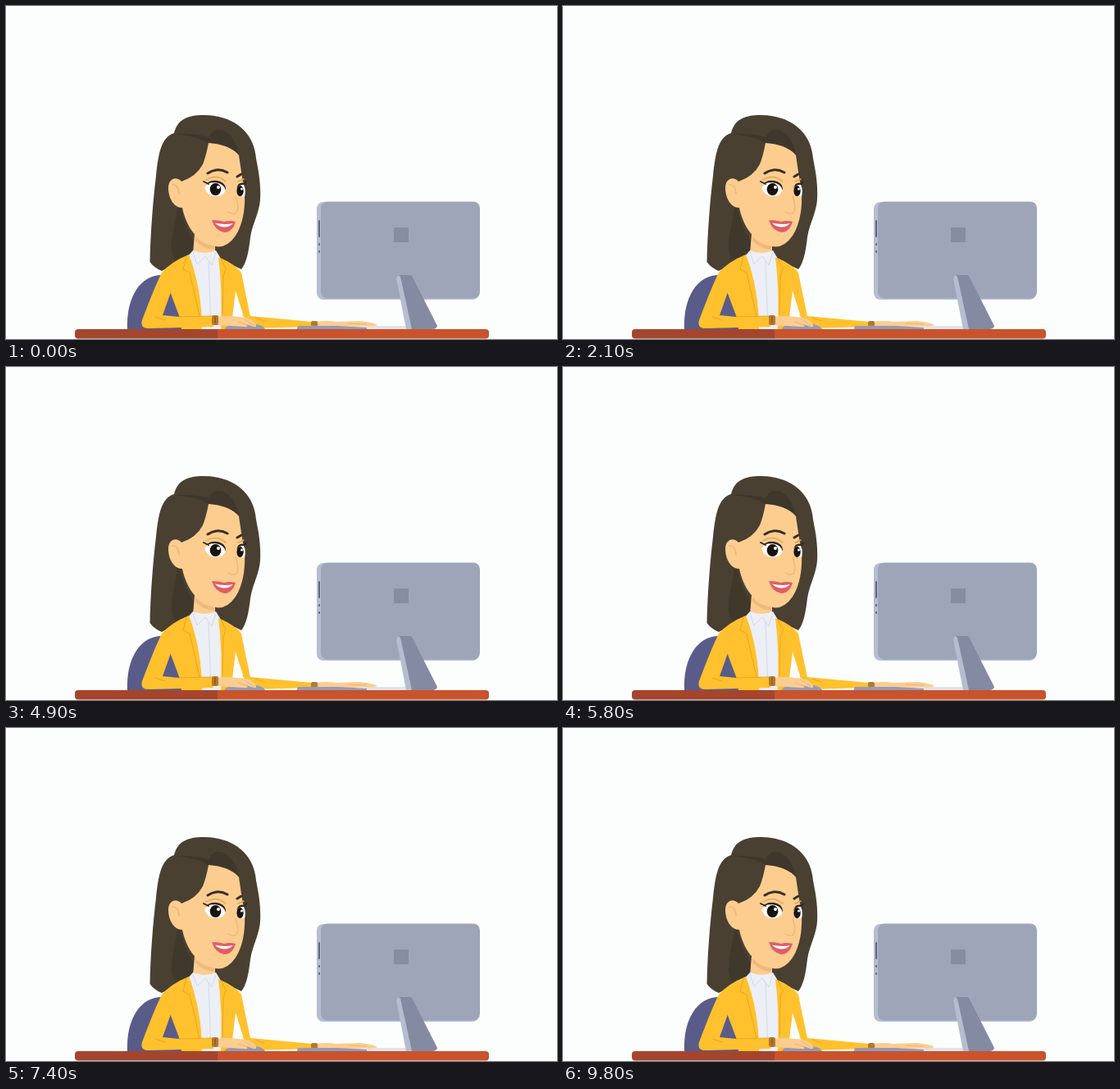
An HTML page for the animation above (10000 ms loop, 672 by 406 pixels).

```html
<!DOCTYPE html>
<html lang="en">
<head>
<meta charset="utf-8">
<title>At the desk</title>
<style>
html, body { margin: 0; width: 100%; height: 100%; overflow: hidden; background: #fcfefd; }
svg { display: block; width: 100%; height: 100%; }
.arm { transform-origin: 190px 325px; animation: slide 5s linear infinite; }
.lid { animation: blink 5s linear infinite; }
@keyframes slide {
  0%, 48% { transform: skewX(0); animation-timing-function: ease-in-out; }
  60%, 67% { transform: skewX(6.9deg); animation-timing-function: ease-in-out; }
  78%, 100% { transform: skewX(0); }
}
@keyframes blink {
  0%, 20% { transform: translateY(0); }
  24%, 25% { transform: translateY(12px); }
  28%, 100% { transform: translateY(0); }
}
</style>
</head>
<body>
<svg viewBox="0 0 672 406" fill="none" stroke-linecap="round" stroke-linejoin="round">
  <defs>
    <clipPath id="eyes">
      <ellipse cx="255" cy="223" rx="13" ry="10.5"/>
      <ellipse cx="287.500" cy="225" rx="6.500" ry="10"/>
    </clipPath>
    <linearGradient id="desk">
      <stop offset=".345" stop-color="#a5452d"/>
      <stop offset=".345" stop-color="#c9532c"/>
    </linearGradient>
  </defs>

  <!-- chair -->
  <path fill="#595c89" d="M148 395C146 355 164 328 190 328L215 345V395Z"/>

  <!-- hair -->
  <path fill="#494032" d="M205 155C209 138 222 133 241 133C279 133 303 155 305 186C308 201 311 217 310 236C309 252 300 267 298 282C296 300 293 314 287 321L262 309L222 306L190 323Q180 319 175.500 312C176 280 179 240 183 207C186 180 189 160 205 155Z"/>
  <path fill="#41382c" d="M213 246C217 268 225 281 231 288L229 302L206 309C196 294 207 268 209 245Z"/>
  <path fill="#3f372b" d="M248 160Q251 149 263 151Q279 157 284 181Q268 170 247 167Q231 158 206 156Q228 155 248 160Z"/>

  <!-- neck and shirt -->
  <path fill="#fccd8f" d="M230 278L228 302H255V287Z"/>
  <path fill="#f0b97c" d="M231 281Q242 292 254 292V297Q241 297 231 286Z"/>
  <path fill="#eceff6" d="M228 298Q242 304 256 298L262 308L264 394H232L220 307Z"/>
  <path stroke="#d5dae6" d="M228 300L233 315L243 305L251 316L256 300M247 312L250 392"/>

  <!-- face -->
  <path fill="#fccd8f" d="M247 167C263 168 277 173 284 182L287 202L291 227C292 247 289 266 280 280Q269 296 255 293C237 290 221 274 215 246C204 246 198 233 198 222C198 210 208 207 214 214Q232 208 240 193Q244 183 247 167Z"/>
  <path stroke="#efb778" stroke-width="1.500" d="M203 218Q210 217 211 229M280 232Q285 247 281 252Q277 255 271 251"/>
  <path stroke="#e3a64f" stroke-width="1.500" d="M244 212Q256 204 268 214M283 214L290 211"/>
  <path stroke="#382e25" stroke-width="3" d="M246 204Q258 196 270 203M282 208L287 205"/>
  <g clip-path="url(#eyes)">
    <path fill="#fff" d="M242 222Q247 213 257 214Q266 215 268 225Q264 233 254 232Q246 231 242 222ZM281 225Q283 216 290 218Q293 224 291 232Q284 234 281 225Z"/>
    <ellipse cx="255.500" cy="223.500" rx="6.800" ry="7.500" fill="#17130f"/>
    <ellipse cx="285.500" cy="225.500" rx="4.200" ry="6.500" fill="#17130f"/>
    <circle cx="259" cy="221" r="2" fill="#fff"/>
    <circle cx="287.500" cy="223" r="1.500" fill="#fff"/>
    <path class="lid" fill="#fccd8f" stroke="#30271f" stroke-width="2.500" d="M236 190V220Q247 213 256 214Q266 215 269 224L280 222Q284 215 295 217V190Z"/>
  </g>
  <path stroke="#30271f" stroke-width="1.800" d="M247 217L241 214M291 217L293 214"/>
  <path fill="#e25c65" d="M251 261Q260 261 266 263Q273 261 280 263Q276 276 266 276Q255 274 251 261Z"/>
  <path fill="#fff" d="M255 264.500Q266 267 277 265Q272 270 265 269.500Q258 268.500 255 264.500Z"/>

  <!-- jacket -->
  <path fill="#ffc12d" d="M223 303Q201 312 190 325L200 348L212 380L214 394H239Q239 345 223 303ZM259 306Q280 315 287 325Q290 340 298 378L290 379L280 347L276 380V394H262Q264 345 259 306Z"/>
  <path stroke="#e9a520" d="M220 305L216 321L224 325L236 378M262 308L268 320L265 330L264 376"/>

  <!-- far arm, keyboard -->
  <path fill="#ffc12d" d="M288 376L298 378L373 385V391L300 393Z"/>
  <path stroke="#e9a520" d="M304 380L315 384"/>
  <path fill="#dfe3ec" d="M408 390H490V395H408Z"/>
  <path fill="#fccd8f" d="M378 385Q390 383 403 385L432 384Q449 386 453 389Q448 392 438 390L405 392L378 390Z"/>
  <path stroke="#e9b577" d="M418 387L440 388"/>
  <rect x="372" y="384" width="8" height="7" rx="2" fill="#b8782a"/>
  <path fill="#929bb8" d="M356 390H405L440 392V395H354Z"/>

  <!-- near arm, mouse -->
  <g class="arm">
    <path fill="#929bb8" d="M266 395Q268 388 284 388H304Q314 389 317 395Z"/>
    <path fill="#fccd8f" d="M257 379Q272 377 283 379Q299 379 304 387Q307 392 302 391L293 388Q297 392 290 391L258 389Z"/>
    <path stroke="#e9b577" d="M283 385L294 389M291 382L303 390"/>
    <path fill="#ffc12d" d="M190 325Q181 343 166 383Q163 394 176 393L253 391V378L211 379L191 377L202 346Z"/>
    <path stroke="#e9a520" d="M211 379L251 378M182 379L194 383"/>
    <rect x="251" y="377" width="8" height="12" rx="2" fill="#b8782a"/>
    <path stroke="#7b511f" d="M255 379V387"/>
  </g>

  <!-- monitor -->
  <rect x="379" y="239" width="198" height="119" rx="8" fill="#b5bdd1"/>
  <rect x="384" y="238.500" width="194" height="118" rx="8" fill="#9fa5b8"/>
  <path stroke="#5e657d" stroke-width="2" d="M382 262V281M382 290V291M382 299V300"/>
  <rect x="473" y="270" width="18" height="18" fill="#878da1"/>
  <path fill="#838aa2" d="M479 328H493Q495 328 496 331L526 390Q525 394 520 394H492Z"/>
  <path fill="#b5bdd1" d="M478 328L481 330L495 394H488L476 332Z"/>

  <rect x="84" y="394" width="505" height="11.500" rx="4" fill="url(#desk)"/>
</svg>
</body>
</html>
```
